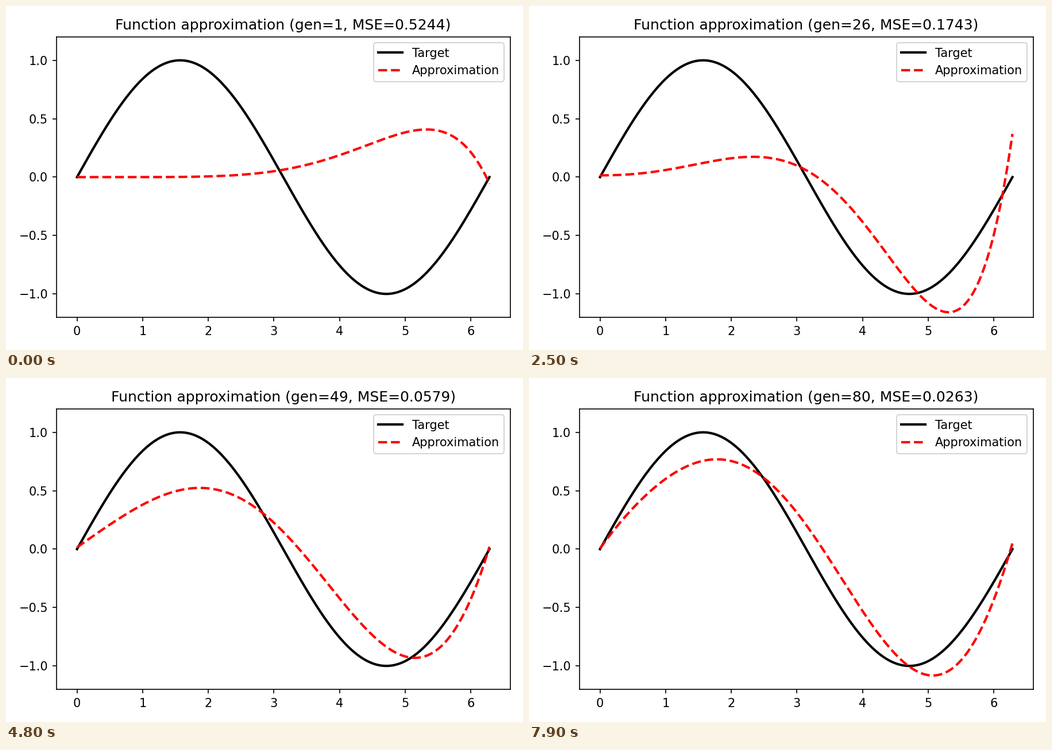
Animation, 900 px wide and 600 px high, one loop 8 s. Source, as a matplotlib script:

```python
import numpy as np
import matplotlib.pyplot as plt
from matplotlib.animation import FuncAnimation

GENERATIONS = 80
END = 2 * np.pi
LEAD = 5       # generations between a partial improvement and the full one
SHARE = 0.55   # how far a partial improvement gets

x = np.linspace(0, END, 200)


def value_row(t):
    return [t**k for k in range(7)]


def slope_row(t):
    return [0] + [k * t**(k - 1) for k in range(1, 7)]


def wave(start, slope, peak, trough, end):
    """Degree 6 polynomial with the given start, two turning points and end."""
    (px, py), (qx, qy) = peak, trough
    rows = [value_row(0), slope_row(0), value_row(px), slope_row(px),
            value_row(qx), slope_row(qx), value_row(END)]
    coef = np.linalg.solve(rows, [start, slope, py, 0, qy, 0, end])
    return np.polynomial.Polynomial(coef)(x)


# Generation at which each best curve is found, its error and its shape
stages = [
    (1, .5244, 2.5245e-5 * x**5.85 * (6.236 - x)),
    (22, .1743, wave(.015, 0, (2.33, .174), (5.31, -1.157), .37)),
    (36, .0993, wave(.005, .345, (1.73, .364), (4.91, -.632), -.187)),
    (48, .0579, wave(.015, .40, (1.87, .524), (5.15, -.931), .02)),
    (60, .0312, wave(.005, .64, (1.75, .66), (5.05, -1.0), -.03)),
    (73, .0263, wave(.005, .79, (1.78, .769), (5.07, -1.082), .05)),
]


def best_at(gen):
    n = sum(stage[0] <= gen for stage in stages) - 1
    _, mse, y = stages[n]
    if n + 1 < len(stages):
        next_gen, next_mse, next_y = stages[n + 1]
        if gen >= next_gen - LEAD:
            mse *= (next_mse / mse)**SHARE
            y = y + SHARE * (next_y - y)
    return mse, y


fig, ax = plt.subplots(figsize=(6, 4), dpi=150)
ax.plot(x, np.sin(x), "k-", lw=2, label="Target")
approx, = ax.plot(x, stages[0][2], "r--", lw=2, label="Approximation")
ax.set_ylim(-1.2, 1.2)
ax.legend(loc="upper right")
title = ax.set_title("")


def update(i):
    gen = i + 1
    mse, y = best_at(gen)
    approx.set_ydata(y)
    title.set_text(f"Function approximation (gen={gen}, MSE={mse:.4f})")
    return approx, title


update(0)
fig.tight_layout()
anim = FuncAnimation(fig, update, frames=GENERATIONS, interval=100,
                     repeat=True, repeat_delay=0)
plt.show()
```
